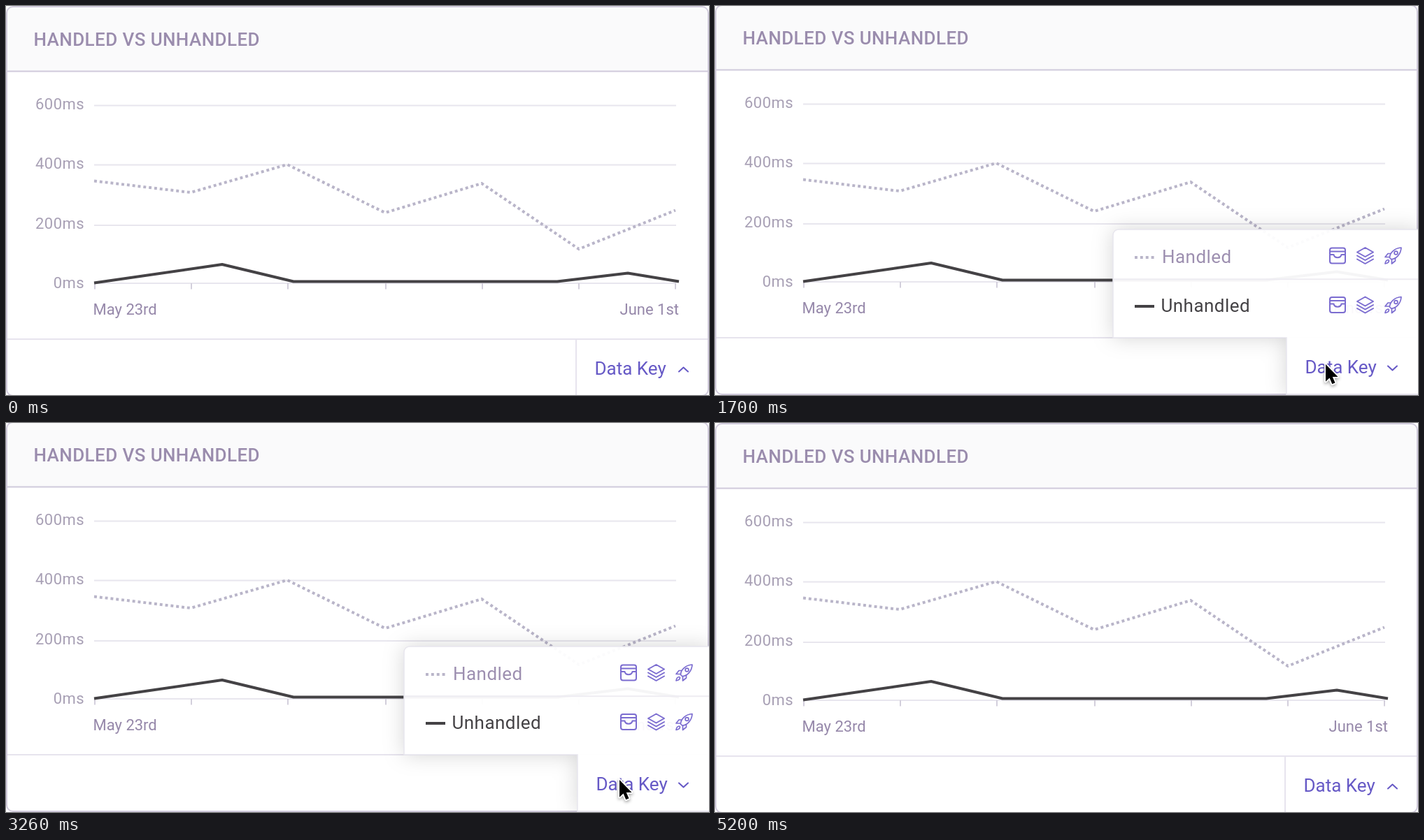
Animation, 1005 px wide and 557 px high, one loop 6280 ms. Source, as an HTML page:

```html
<!DOCTYPE html>
<html lang="en">
<head>
<meta charset="utf-8">
<title>Handled vs unhandled</title>
<style>
  html, body { margin: 0; width: 100%; height: 100%; overflow: hidden; background: #fff; }
  svg { display: block; width: 1005px; height: 557px; overflow: hidden; }
  text { font-family: Roboto, Inter, sans-serif; font-size: 26px; }
  .title { font-weight: 500; letter-spacing: .4px; fill: #9a8cad; }
  .axis { font-size: 22px; letter-spacing: .45px; fill: #a8a0b5; text-anchor: end; }
  .date { font-size: 22px; fill: #9688aa; }
  .key { fill: #6659c6; }
  .legend { letter-spacing: .45px; }
  .line { fill: none; stroke-width: 2; }
  .icon { fill: none; stroke: #7b6cd0; stroke-width: 2; stroke-linejoin: round; stroke-linecap: round; }
  .fine { stroke-width: 1.7; }
  .chevron { fill: none; stroke: #6659c6; stroke-width: 2; stroke-linejoin: round; stroke-linecap: round; }
  .dots { fill: none; stroke: #b9b5c9; stroke-width: 4; stroke-dasharray: 3.935; }
  .solid { fill: none; stroke: #444245; stroke-width: 4; stroke-linejoin: round; }
  .shadow { filter: drop-shadow(0 0 15px rgba(0, 0, 0, .17)); }
  .pointer { filter: drop-shadow(0 2px 2px rgba(0, 0, 0, .35)); }
</style>
</head>
<body>
<svg viewBox="0 0 1005 557">
  <defs>
    <path id="chev" d="M-6.5-3 0 3 6.5-3"/>
    <path id="shape" d="M569 475V328A8 8 0 0 1 577 320H1007V557H817V475Z"/>
    <clipPath id="outside">
      <path clip-rule="evenodd" d="M0 0H1005V557H0ZM569 475V328A8 8 0 0 1 577 320H1007V557H817V475Z"/>
    </clipPath>
    <g id="icons" class="icon">
      <g transform="translate(890 357.5)">
        <rect x="-11" y="-11" width="22" height="22" rx="3"/>
        <path d="M-11-6H11M-11-1.5H-5.5C-4.5 4 4.500 4 5.500-1.5H11"/>
      </g>
      <g transform="translate(929.5 357.5)">
        <path d="M0-11.500 11.500-5 0 1.500-11.500-5ZM-11.500 0 0 6.500 11.500 0M-11.500 5 0 11.500 11.500 5"/>
      </g>
      <g class="fine" transform="translate(969.5 357.5)">
        <path d="M-5 3C-5-4 2-11 11.500-11.500 11-2 4 5-3 5ZM-3.500-3H-7.500L-11.500 2H-5M3 3.500V7.500L-2 11.500V5"/>
        <circle cx="4" cy="-4" r="2.400"/>
        <path d="M-7 6C-10 6-11 8.500-11.500 11.500-8.500 11-6 10-6 7Z"/>
      </g>
    </g>
  </defs>

  <g id="card">
    <rect x="1" y="1" width="1003" height="557" rx="9" fill="#fff"/>
    <path d="M1 93.500V10A9 9 0 0 1 10 1H995A9 9 0 0 1 1004 10V93.500Z" fill="#fafafb"/>
    <path class="line" d="M1 93.500H1004" stroke="#d0cadb"/>
    <path class="line" d="M1 477H1004" stroke="#e7e4ee"/>
    <rect class="line" x="1" y="1" width="1003" height="557" rx="9" stroke="#d2ccdd"/>
    <text class="title" x="39.500" y="57">HANDLED VS UNHANDLED</text>
    <g id="grid"></g>
    <text class="date" x="124.500" y="441.500">May 23rd</text>
    <text class="date" x="962" y="441.500" text-anchor="end">June 1st</text>
    <polyline class="dots" points="126,250.500 264,267 402,227 542,296 680,254 819,348 957,292.500"/>
    <polyline class="solid" points="126,396.500 309,370 411,394.500 788,394.500 889,382.500 962,394.500"/>
  </g>

  <path id="split" class="line" d="M815 477V557" stroke="#e7e4ee"/>
  <text id="label" class="key" x="841.500" y="528">Data Key</text>
  <use id="arrow" class="chevron" href="#chev"/>

  <g id="panel">
    <g clip-path="url(#outside)"><use class="shadow" href="#shape"/></g>
    <use href="#shape" fill="#fff" fill-opacity=".95" stroke="#e8e6ee" stroke-width="1.500"/>
    <path class="line" d="M817 556H1005" stroke="#e7e4ee"/>
    <path class="dots" d="M600 360H628"/>
    <text class="legend" x="639" y="367.500" fill="#9d8fb0">Handled</text>
    <use href="#icons"/>
    <path class="solid" d="M600 430H628"/>
    <text class="legend" x="637.500" y="437.500" fill="#444245">Unhandled</text>
    <use href="#icons" y="70.500"/>
    <text class="key" x="843.500" y="526">Data Key</text>
    <use class="chevron" href="#chev" transform="translate(968.500 518.500)"/>
  </g>
  <path id="divider" class="line" d="M569 391.200H1005" stroke="#eeecf2"/>

  <g id="cursor" class="pointer">
    <path transform="translate(1 2) scale(.9)" d="M0 0V27.500L6.200 21.800 10.300 31.500 15 29.500 10.900 20H19.500Z"
      fill="#000" stroke="#fff" stroke-width="4" stroke-linejoin="round" paint-order="stroke"/>
  </g>
</svg>
<script>
  const LOOP = 6280, STEP = 20, FADE = 300;
  const $ = id => document.getElementById(id);

  const levels = [['600ms', 142.5, 148], ['400ms', 227.5, 232.5], ['200ms', 314, 319], ['0ms', 397, 404]];
  const ticks = [127, 265, 403, 543, 681, 819, 957];
  $('grid').innerHTML = levels.map(([name, y, base]) =>
    `<path class="line" d="M126 ${y}H958" stroke="#e8e6ee"/><text class="axis" x="112" y="${base}">${name}</text>`
  ).join('') + ticks.map(x => `<path class="line" d="M${x} 397V405.5" stroke="#d3cfdc"/>`).join('');

  const linear = p => p;
  const quadIn = p => p * p;
  const inOut = p => p < .5 ? 2 * p * p : 1 - 2 * (1 - p) ** 2;

  // Same curve as the CSS "ease" keyword.
  function ease(p) {
    if (p <= 0) return 0;
    if (p >= 1) return 1;
    let lo = 0, hi = 1, s;
    const curve = (a, b) => 3 * (1 - s) ** 2 * s * a + 3 * (1 - s) * s * s * b + s ** 3;
    for (let i = 0; i < 20; i++) {
      s = (lo + hi) / 2;
      if (curve(.25, .25) < p) lo = s; else hi = s;
    }
    return curve(.1, 1);
  }

  // Pointer moves: start, end, from x, from y, to x, to y, easing
  const moves = [
    [120, 280, 954, -90, 592, 593, linear],
    [650, 700, 662, 547, 661, 562, quadIn],
    [980, 1300, 662, 562, 740, 514, inOut],
    [1300, 1480, 740, 514, 872, 511, inOut],
    [2130, 2330, 872, 511, 718, 496, inOut],
    [2790, 3080, 718, 496, 876, 509, inOut],
    [3730, 3870, 876, 509, 763, 512, inOut],
    [5000, 5200, 763, 512, 743, -45, inOut]
  ];
  const hovers = [[1400, 2220], [2960, 3800]];

  function pointer(t) {
    const m = moves.filter(m => m[0] < t).pop();
    if (!m) return [0, -100];
    const [start, end, x0, y0, x1, y1, curve] = m;
    const p = curve(Math.min(1, (t - start) / (end - start)));
    return [x0 + (x1 - x0) * p, y0 + (y1 - y0) * p];
  }

  function draw(t) {
    let over = false, shown = 0, turn = 180;
    for (const [start, end] of hovers) {
      if (t < start) continue;
      over = t < end;
      shown = over ? ease((t - start) / FADE) : 1 - ease((t - end) / FADE);
      turn = over ? 45 * (1 - shown) : 180;
    }
    const [x, y] = pointer(t);
    const show = (id, on) => $(id).setAttribute('visibility', on ? 'visible' : 'hidden');

    $('card').setAttribute('transform', `translate(0 ${over ? -2 : 0})`);
    show('split', !over);
    show('divider', over);
    $('label').setAttribute('transform', over ? 'translate(2 -2)' : 'translate(0 0)');
    $('arrow').setAttribute('transform', `translate(968.5 ${over ? 518.5 : 520.5}) rotate(${turn})`);
    $('panel').setAttribute('opacity', shown);
    show('cursor', y > -40 && y < 559);
    $('cursor').setAttribute('transform', `translate(${x} ${y})`);
  }

  const origin = performance.now();
  function tick() {
    const t = (performance.now() - origin) % LOOP;
    draw(Math.floor(t / STEP) * STEP);
    requestAnimationFrame(tick);
  }
  tick();
</script>
</body>
</html>
```
